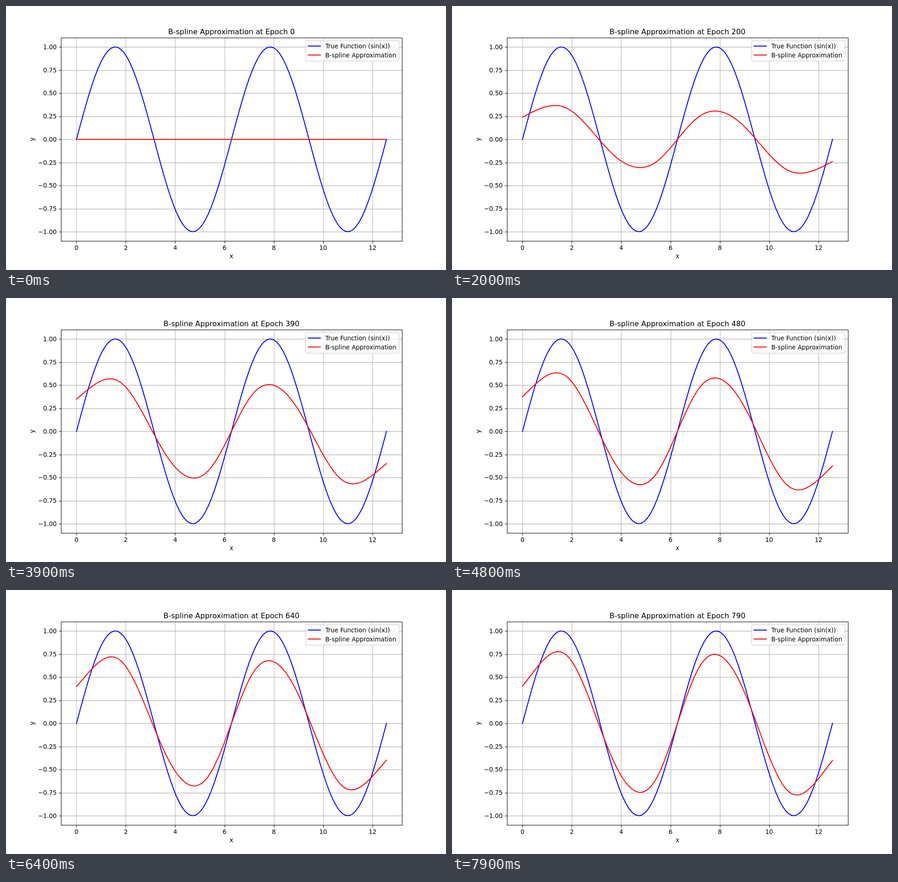
Animation, 966 px wide and 580 px high, one loop 8 s. Source, as an HTML page:

```html
<!DOCTYPE html>
<html lang="en">
<head>
<meta charset="utf-8">
<title>B-spline Approximation</title>
<style>
  html, body { margin: 0; width: 100%; height: 100%; overflow: hidden; background: #fff; }
  svg { display: block; width: 966px; height: 580px; }
  text { font: 13.89px "DejaVu Sans", Verdana, sans-serif; fill: #000; }
  #title { font-size: 16.67px; }
  .mid { text-anchor: middle; }
  .end { text-anchor: end; }
  .grid { stroke: #b0b0b0; stroke-width: 1.11; }
  .axis { stroke: #000; stroke-width: 1.11; fill: none; }
  .curve { fill: none; stroke-width: 2.08; stroke-linecap: square; stroke-linejoin: round; }
  .true { stroke: #00f; }
  .fit { stroke: #f00; }
</style>
</head>
<body>
<svg viewBox="0 0 1000 600" preserveAspectRatio="none">
  <g id="axes"></g>
  <path id="true" class="curve true"/>
  <path id="fit" class="curve fit"/>
  <rect class="axis" x="125.5" y="72.5" width="775" height="462"/>
  <text id="title" class="mid" x="512.5" y="64"></text>
  <text class="mid" x="512.5" y="573.6">x</text>
  <text class="mid" transform="translate(63.7 303) rotate(-90)">y</text>
  <rect x="681.2" y="79" width="212" height="46.4" rx="2.8" fill="#fff" fill-opacity=".8"
    stroke="#ccc" stroke-opacity=".8" stroke-width="1.39"/>
  <path class="curve true" d="M686.7 91H714.5"/>
  <path class="curve fit" d="M686.7 111.4H714.5"/>
  <text x="725.6" y="96">True Function (sin(x))</text>
  <text x="725.6" y="116.4">B-spline Approximation</text>
</svg>
<script>
const $ = id => document.getElementById(id);
const END = 4 * Math.PI, SPANS = 7, STEP = END / SPANS, COUNT = SPANS + 3;
const FRAMES = 80, FRAME_MS = 100, EPOCHS = 10, RATE = 0.0201;

const toX = x => 125 + 775 * (x / END + 0.05) / 1.1;
const toY = y => 303 - 210 * y;
const snap = v => Math.floor(v + 0.5) + 0.5;
const linspace = n => Array.from({ length: n }, (_, i) => END * i / (n - 1));

// Uniform cubic B-spline, one bump per control point
function bump(s) {
  s = Math.abs(s);
  if (s < 1) return (4 - 6 * s * s + 3 * s ** 3) / 6;
  return s < 2 ? (2 - s) ** 3 / 6 : 0;
}
const basis = x => Array.from({ length: COUNT }, (_, j) => bump(x / STEP - j + 1));
const dot = (a, b) => a.reduce((sum, v, i) => sum + v * b[i], 0);

const plotX = linspace(100), plotBasis = plotX.map(basis);
const trainX = linspace(50), trainBasis = trainX.map(basis);

const pathOf = ys => 'M' + ys.map((y, i) =>
  toX(plotX[i]).toFixed(2) + ' ' + toY(y).toFixed(2)).join('L');

// Gradient descent on the mean squared error
function descend(c) {
  const grad = c.map(() => 0);
  trainX.forEach((x, i) => {
    const row = trainBasis[i], err = dot(row, c) - Math.sin(x);
    row.forEach((b, j) => grad[j] += 2 * err * b / trainX.length);
  });
  return c.map((v, j) => v - RATE * grad[j]);
}

const paths = [];
let control = Array(COUNT).fill(0);
for (let f = 0; f < FRAMES; f++) {
  paths.push(pathOf(plotBasis.map(row => dot(row, control))));
  for (let e = 0; e < EPOCHS; e++) control = descend(control);
}

let axes = '';
for (let v = 0; v <= 12; v += 2) {
  const x = snap(toX(v));
  axes += `<path class="grid" d="M${x} 72V534"/><path class="axis" d="M${x} 534.5v4.86"/>
    <text class="mid" x="${toX(v)}" y="554.8">${v}</text>`;
}
for (let v = -1; v <= 1; v += 0.25) {
  const y = snap(toY(v));
  axes += `<path class="grid" d="M125 ${y}H900"/><path class="axis" d="M125.5 ${y}h-4.86"/>
    <text class="end" x="115.3" y="${toY(v) + 5.2}">${v.toFixed(2).replace('-', '\u2212')}</text>`;
}
$('axes').innerHTML = axes;
$('true').setAttribute('d', pathOf(plotX.map(Math.sin)));

let shown = -1;
function draw(now) {
  const f = Math.floor(now / FRAME_MS) % FRAMES;
  if (f !== shown) {
    shown = f;
    $('fit').setAttribute('d', paths[f]);
    $('title').textContent = 'B-spline Approximation at Epoch ' + f * EPOCHS;
  }
}
const start = performance.now();
function tick() {
  draw(performance.now() - start);
  requestAnimationFrame(tick);
}
tick();
</script>
</body>
</html>
```
